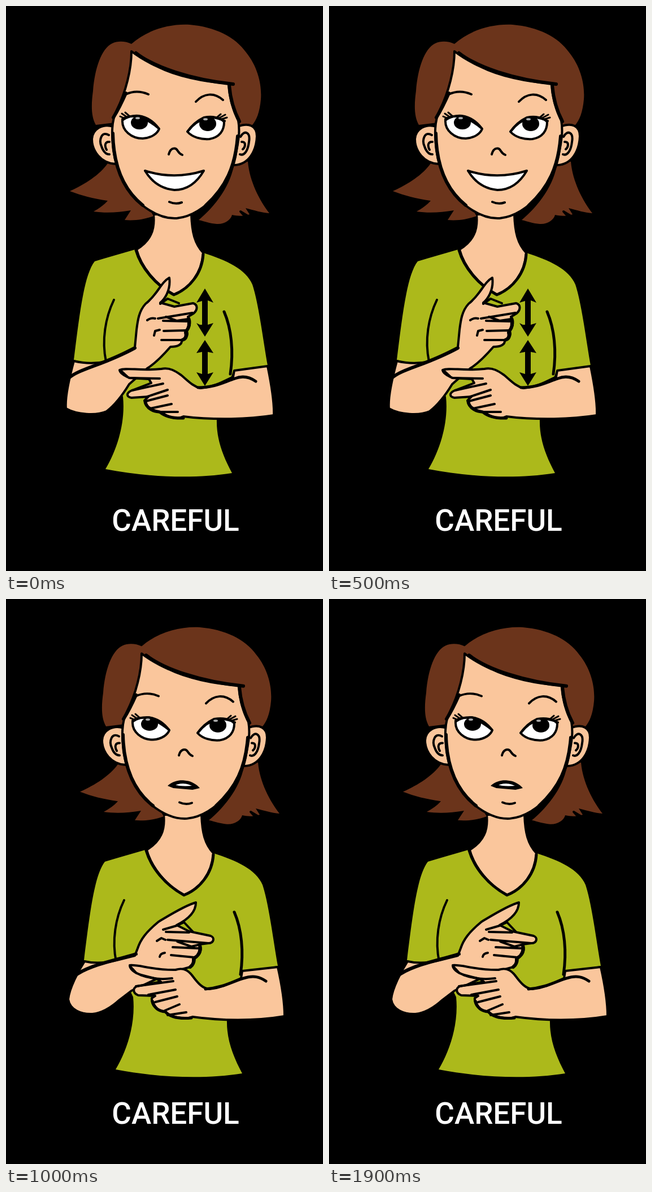
These frames come from a looping animation (561 by 998 pixels, 2 s). An HTML page:

```html
<!DOCTYPE html>
<html lang="en">
<head>
<meta charset="utf-8">
<title>Careful</title>
<style>
  html, body { margin: 0; width: 100%; height: 100%; overflow: hidden; background: #000; }
  svg { display: block; width: 561px; height: 998px; }
  path { stroke: #000; stroke-width: 4; stroke-linecap: round; stroke-linejoin: round; }
  .line { fill: none; }
  .thick { fill: none; stroke-width: 6; }
  .hair { fill: #6b341b; stroke: none; }
  .skin { fill: #fac69c; }
  .shirt { fill: #acb91b; stroke: none; }
  .white { fill: #fff; }
  .ink { fill: #000; stroke: none; }
  text { font: 500 53px Roboto, sans-serif; fill: #fff; text-anchor: middle; }
</style>
</head>
<body>
<svg viewBox="0 0 561 998">
  <g id="torso">
    <path class="shirt" d="M229 430C205 437 180 444 157 451C138 475 130 545 120 625Q150 634 178 630L207 690C212 740 194 788 176 818C250 832 330 836 400 825C384 795 372 765 373 730L402 645L463 635C455 590 447 525 436 492C425 465 390 449 349 436L298 510Z"/>
    <path class="skin" stroke="none" d="M261 368C264 395 256 415 231 430C239 460 264 492 297 510C325 499 347 472 349 436C334 420 329 400 328 368Z"/>
    <path class="line" style="stroke-width:5" d="M230 431C239 462 264 492 297 510C325 499 347 472 349 438"/>
    <path class="line" d="M191 519C176 550 169 590 177 628"/>
    <path class="line" style="stroke-width:5" d="M386 540C399 570 403 610 397 650"/>
  </g>

  <g id="head">
    <path class="hair" d="M180 278C166 298 140 315 113 327C134 335 153 340 180 344C174 351 164 358 155 363C175 366 198 365 221 361L210 378C232 380 250 375 261 371L240 335L198 275Z"/>
    <path class="hair" d="M428 275C431 310 449 344 466 366C452 365 440 361 424 357L431 368C420 372 411 371 400 369C398 378 386 386 373 385C361 384 353 381 341 378C370 354 400 315 404 275Z"/>
    <path class="white" stroke="none" d="M415 363L430 372L424 373Z"/>
    <path class="hair" d="M159 210C150 195 151 172 154 150C157 110 169 75 188 66C198 61 212 62 222 67C250 42 290 31 325 33C370 37 405 54 425 82C446 108 453 140 451 165C449 188 443 202 436 210L400 210L200 205Z"/>
    <path class="skin" d="M190 213C171 207 153 217 152 235C152 256 168 278 194 279M410 213C430 205 444 212 444 230C443 256 430 280 404 281"/>
    <path class="line" d="M182 228C169 220 164 237 169 248C172 257 177 262 183 262M183 240C175 239 174 247 178 254M415 231C422 218 433 223 430 240C428 257 421 265 414 262M417 240C425 239 424 249 419 253"/>
    <path class="skin" d="M222 80C222 112 212 152 196 184C186 203 187 228 190 255C195 290 211 325 240 351C264 370 285 376 302 375C330 372 354 355 374 331C395 305 404 283 408 255C412 235 414 220 411 202C401 182 395 160 394 137C350 134 302 124 270 108C250 99 235 90 222 80Z"/>
    <path class="thick" d="M230 83C262 108 326 130 402 138M212 154C205 170 198 184 190 197M395 140C397 165 403 185 413 204M189 225C190 284 208 325 242 352M410 230C406 284 389 320 354 352"/>
    <path class="line" d="M212 156C225 150 238 150 252 156M336 169C350 154 368 152 384 166"/>
    <path class="white" d="M206 202C205 220 222 234 242 234C258 233 268 225 271 217C262 205 250 196 235 194C225 193 213 196 206 202ZM321 222C330 232 345 236 360 235C378 232 386 220 386 205C380 197 365 194 350 197C337 203 328 212 321 222Z"/>
    <ellipse cx="236" cy="206" rx="15" ry="12"/>
    <ellipse cx="357" cy="208" rx="15" ry="13"/>
    <path class="line" d="M206 200C221 190 244 194 270 216M322 221C341 196 365 192 387 203"/>
    <path class="line" style="stroke-width:3" d="M202 195L211 199M205 190L215 197M211 188L219 195M391 197L381 200M388 192L377 198M380 191L373 197"/>
    <ellipse cx="233" cy="198" rx="4" ry="2" fill="#aaa"/>
    <ellipse cx="353" cy="200" rx="4" ry="2" fill="#aaa"/>
    <path class="line" d="M288 262C291 250 300 249 304 256Q307 261 312 263M289 346Q300 351 311 347"/>
  </g>

  <g id="smiling">
    <path class="white" d="M246 291C280 302 315 302 350 291C336 315 318 325 298 325C275 323 258 311 246 291Z"/>
    <path class="ink" d="M343 521L343 563L337 560L352 584L367 560L357 563V520L367 524L352 499L337 524L347 521V563H343ZM337 613L352 590L367 613L357 611V650L367 647L352 671L337 647L347 650V611Z"/>
    <path class="skin" d="M120 627C113 653 104 690 106 711C125 722 160 724 178 716C195 703 207 686 218 668L250 640C266 630 278 617 291 602C304 602 312 598 311 590C321 587 323 579 319 573C327 565 327 554 322 549L332 543C340 536 339 527 331 525L298 531L273 524C281 518 292 501 289 480C274 488 268 510 247 526C235 539 233 556 231 572L228 603L178 628Q148 634 120 627Z"/>
    <path class="thick" d="M110 658C130 640 171 635 228 604"/>
    <path class="line" d="M273 526L286 517L306 525M269 552L330 542M283 549L302 556L322 553M278 556L320 557M279 574L318 573M275 590L310 590M250 555Q257 550 264 552M262 582L264 574L272 572M322 552C329 562 323 569 319 574"/>
    <path class="line" style="stroke-width:6" d="M323 554Q326 565 320 573M318 577Q321 587 312 590"/>
    <path class="skin" d="M463 636C470 670 475 700 474 723C430 730 370 732 314 725C303 731 289 728 275 717C263 719 247 712 245 697L252 690L222 692C212 690 213 683 223 679L257 666L253 659L219 657C209 653 202 648 201 643C212 638 238 645 275 641C290 638 300 645 310 652C322 662 331 672 344 675C373 672 388 661 402 655L404 644Z"/>
    <path class="line" d="M218 657L272 658M223 679L278 667M250 690L286 678M248 698L286 688M255 711L293 703M274 717L304 717M202 643L214 654"/>
    <path class="line" style="stroke-width:5" d="M340 674C370 674 386 664 405 658C420 652 432 656 442 663M247 700Q250 713 272 717Q286 729 314 728"/>
  </g>

  <g id="worried">
    <path class="ink" d="M286 330C296 320 311 319 319 321C329 322 338 328 343 334L330 337L296 334Z"/>
    <path class="white" stroke="none" d="M294 329C305 323 321 321 334 331Q313 335 294 329Z"/>
    <path class="skin" d="M139 640C128 657 112 687 110 707C113 726 133 734 153 733C174 731 190 718 201 708L222 692L290 660L326 650C333 645 335 639 333 633C344 630 347 619 343 610L358 608C368 608 370 598 362 595L324 587L302 576C320 567 336 555 336 536C317 541 287 560 270 570C247 589 238 602 233 617L228 630L196 638Q165 646 139 640Z"/>
    <path class="thick" d="M120 667C143 648 184 641 230 627"/>
    <path class="line" d="M278 584L302 577M302 577L315 571L331 588M283 588L324 589M286 602L358 608M303 605L328 614L344 610M295 615L340 617M292 629L333 633M267 604L275 599L282 602M272 632Q273 626 281 625"/>
    <path class="line" style="stroke-width:6" d="M343 612Q346 626 334 634M332 636Q333 645 326 650"/>
    <path class="skin" d="M481 650C488 681 493 710 493 737C440 746 380 745 330 738C315 744 289 738 281 728C266 728 257 717 258 705L264 701L234 700C224 696 224 687 232 684L274 676L267 671L239 664C226 660 219 653 219 647C233 645 262 656 300 655C315 650 324 657 331 667C340 679 348 688 360 689C387 686 403 675 416 670L418 657Z"/>
    <path class="line" d="M238 664Q265 674 294 670M230 684L296 675M252 699L300 690M264 712L303 702M281 727L307 716M286 735L319 730M220 649L231 661"/>
    <path class="line" style="stroke-width:5" d="M353 689C386 686 402 675 420 670C439 664 450 668 460 675M259 710Q264 728 282 729Q294 743 328 740"/>
  </g>

  <text x="300" y="927">CAREFUL</text>
</svg>
<script>
  const LOOP = 2000;
  const part = id => document.getElementById(id);
  const show = (id, on) => part(id).setAttribute('visibility', on ? 'visible' : 'hidden');

  function draw() {
    const worried = performance.now() % LOOP >= LOOP / 2;
    show('smiling', !worried);
    show('worried', worried);
    part('torso').setAttribute('transform', worried ? 'translate(18 13)' : '');
    part('head').setAttribute('transform', worried ? 'translate(18 17.4) scale(1 .988)' : '');
    requestAnimationFrame(draw);
  }
  draw();
</script>
</body>
</html>
```
